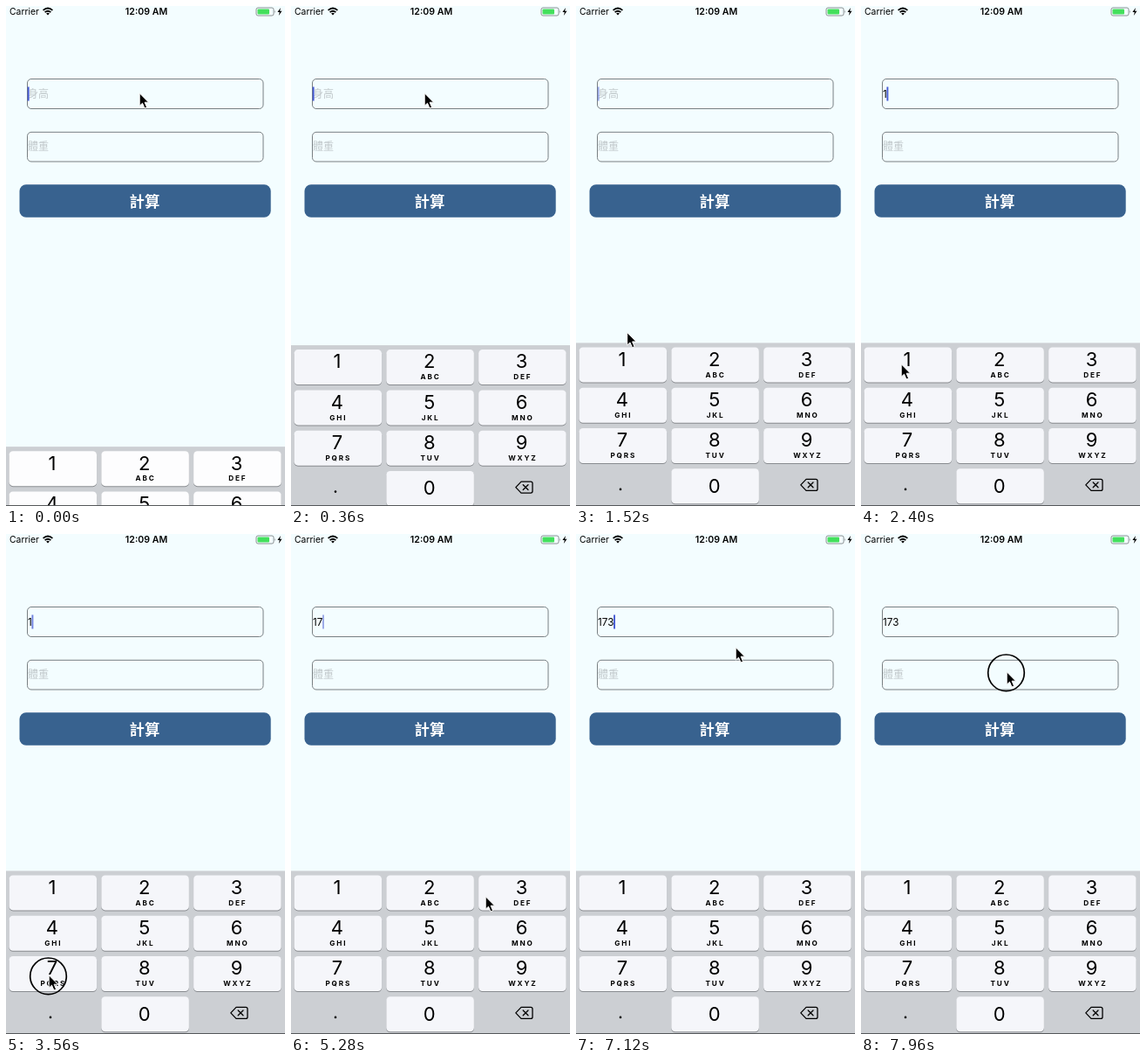
Write an HTML page that moves like this. It is 320 px wide and 572 px high and loops after 8000 ms.

```html
<!DOCTYPE html>
<html lang="zh-Hant">
<head>
<meta charset="utf-8">
<title>BMI form</title>
<style>
  html, body { margin: 0; width: 100%; height: 100%; overflow: hidden; background: #f3fdff; }
  svg { display: block; width: 320px; height: 572px; }
  text { font-family: Inter, "Noto Sans CJK TC", "Noto Sans CJK", sans-serif; fill: #000; }
  .field { fill: none; stroke: #797f82; }
  .hint { font: 500 12px "Noto Sans CJK TC", "Noto Sans CJK", sans-serif; fill: #c1c8cb; }
  .title { font: 700 17.4px "Noto Sans CJK TC", "Noto Sans CJK", sans-serif; fill: #fff; }
  .digit { font-size: 22px; text-anchor: middle; }
  .abc { font-size: 8.2px; font-weight: 700; letter-spacing: 1.8px; text-anchor: middle; }
</style>
</head>
<body>
<svg viewBox="0 0 320 572">
  <rect width="320" height="572" fill="#f3fdff"/>

  <text x="4" y="10" font-size="10.4">Carrier</text>
  <g fill="none" stroke="#000" stroke-width="1.8">
    <path d="M42.6 4.9Q48 .1 53.4 4.9M44.6 7.2Q48 4.2 51.4 7.2"/>
    <path d="M46.1 8.6Q48 7 49.9 8.6L48 10.6Z" fill="#000" stroke="none"/>
  </g>
  <text x="161" y="10" font-size="10.6" font-weight="600" text-anchor="middle">12:09 AM</text>
  <rect x="287" y="2" width="20" height="9" rx="2" fill="none" stroke="#8c9294"/>
  <rect x="288.5" y="3.5" width="13.5" height="6" rx="1" fill="#43e05c"/>
  <path d="M308.3 4.8q1.6 1.7 0 3.4z" fill="#8c9294"/>
  <path d="M315 2l-3.6 5h2.4l-1 4 3.7-5.2h-2.4z"/>

  <rect class="field" x="24.5" y="83.5" width="270.5" height="34" rx="4.5"/>
  <rect class="field" x="24.5" y="144.3" width="270.5" height="33.7" rx="4.5"/>
  <text class="hint" id="hint" x="25" y="105">身高</text>
  <text class="hint" x="25" y="165">體重</text>
  <text id="value" x="25" y="104.7" font-size="11.7"></text>
  <rect id="caret" y="92.5" width="1.9" height="16" fill="#4459d2"/>
  <rect x="15.5" y="204.2" width="288.2" height="37.5" rx="7.5" fill="#38628f"/>
  <text class="title" x="159" y="229.6" text-anchor="middle">計算</text>

  <g id="board">
    <rect width="320" height="190" fill="#cccfd3"/>
    <g id="keys"></g>
    <circle cx="51" cy="167.5" r="1.3"/>
    <g fill="none" stroke="#000" stroke-width="1.3" stroke-linejoin="round" stroke-linecap="round">
      <path d="M264 156H275Q277 156 277 158V167Q277 169 275 169H264L257.8 162.5Z"/>
      <path d="M266.2 159.6l5.8 5.8m0-5.8l-5.8 5.8"/>
    </g>
  </g>
  <rect y="571" width="320" height="1" fill="#55585a"/>

  <circle id="ring" r="20.8" fill="none" stroke="#000" stroke-width="1.7"/>
  <path id="arrow" d="M.2-.3V14.2L3.5 11.2L6 17L8.6 15.9L6.1 10.2H10.6Z"
        stroke="#fff" stroke-linejoin="round"/>
</svg>
<script>
const $ = id => document.getElementById(id);
const LOOP = 8000, BOARD_TOP = 385.4;
const PRESS = 220, LAG = 60;              // ring time; delay of the key's highlight
const CARET_ON = 1040, CARET_OFF = 440, FADE = 80;

const letters = ['', 'ABC', 'DEF', 'GHI', 'JKL', 'MNO', 'PQRS', 'TUV', 'WXYZ'];
const makeKey = (digit, col, row, abc) => {
  const x = 3.5 + col * 105.8, y = 5 + row * 46.3, mid = x + 50;
  return `<rect x="${x}" y="${y + 1}" width="100.6" height="40" rx="4.5" fill="#898c90"/>
    <rect id="key${digit}" x="${x}" y="${y}" width="100.6" height="40" rx="4.5"/>
    <text class="digit" x="${mid - .6}" y="${y + (digit ? 21.4 : 27.4)}">${digit}</text>
    <text class="abc" x="${mid + .8}" y="${y + 34.2}">${abc}</text>`;
};
$('keys').innerHTML = letters.map((abc, i) => makeKey(i + 1, i % 3, Math.floor(i / 3), abc)).join('')
  + makeKey(0, 1, 3, '');

// Where the pointer goes, when, and how far its way bows sideways
const stops = [
  { from: 0, to: 1, x: 153, y: 100, bow: 0 },
  { from: 860, to: 1700, x: 46, y: 410, bow: 0 },
  { from: 2540, to: 3360, x: 49, y: 505, bow: 0 },
  { from: 3820, to: 4580, x: 223, y: 415, bow: 0 },
  { from: 6380, to: 7100, x: 183, y: 130, bow: .09 },
  { from: 7240, to: 7800, x: 167, y: 158, bow: 0 }
];
const presses = [
  { at: 1780, key: 1 }, { at: 3520, key: 7 }, { at: 5320, key: 3 }, { at: 7880 }
];

const clamp = v => Math.max(0, Math.min(1, v));
const ease = v => v * v * (3 - 2 * v);
const held = (press, t) => t >= press.at && t < press.at + PRESS;

function pointer(t) {
  const i = stops.findLastIndex(s => t >= s.from);
  const b = stops[i], a = stops[Math.max(0, i - 1)];
  const u = ease(clamp((t - b.from) / (b.to - b.from)));
  const dx = b.x - a.x, dy = b.y - a.y, side = 2 * u * (1 - u) * b.bow;
  return [a.x + dx * u - dy * side, a.y + dy * u + dx * side];
}

// The caret blinks from the last keystroke on
function caretAlpha(t, since) {
  if (t >= presses.at(-1).at) return 0;
  const phase = (t - since) % (CARET_ON + CARET_OFF);
  const fadeIn = t - since > CARET_ON ? clamp(phase / FADE) : 1;
  return Math.min(fadeIn, 1 - clamp((phase - CARET_ON) / FADE));
}

function draw(t) {
  const settle = Math.exp(-t / 95);
  $('board').setAttribute('transform', `translate(0 ${BOARD_TOP + 120 * settle})`);
  const fill = `rgb(${245 + 8 * settle},${246 + 7 * settle},${250 + 4 * settle})`;

  const [x, y] = pointer(t);
  $('arrow').setAttribute('transform', `translate(${x} ${y})`);
  $('ring').setAttribute('transform', `translate(${x - .5} ${y + .8})`);
  $('ring').style.display = presses.some(p => held(p, t)) ? '' : 'none';

  for (let i = 0; i < 10; i++) {
    const down = presses.some(p => p.key === i && held(p, t - LAG));
    $('key' + i).setAttribute('fill', down ? '#b9bec8' : fill);
  }

  const typed = presses.filter(p => p.key && t >= p.at + PRESS + 20);
  $('value').textContent = typed.map(p => p.key).join('');
  $('hint').style.display = typed.length ? 'none' : '';
  const since = typed.length ? typed.at(-1).at + PRESS + 20 : 0;
  $('caret').setAttribute('x', 24.7 + $('value').getComputedTextLength());
  $('caret').setAttribute('opacity', caretAlpha(t, since));
}

const begin = performance.now();
function tick() {
  draw((performance.now() - begin) % LOOP);
  requestAnimationFrame(tick);
}
draw(0);
requestAnimationFrame(tick);
</script>
</body>
</html>
```
